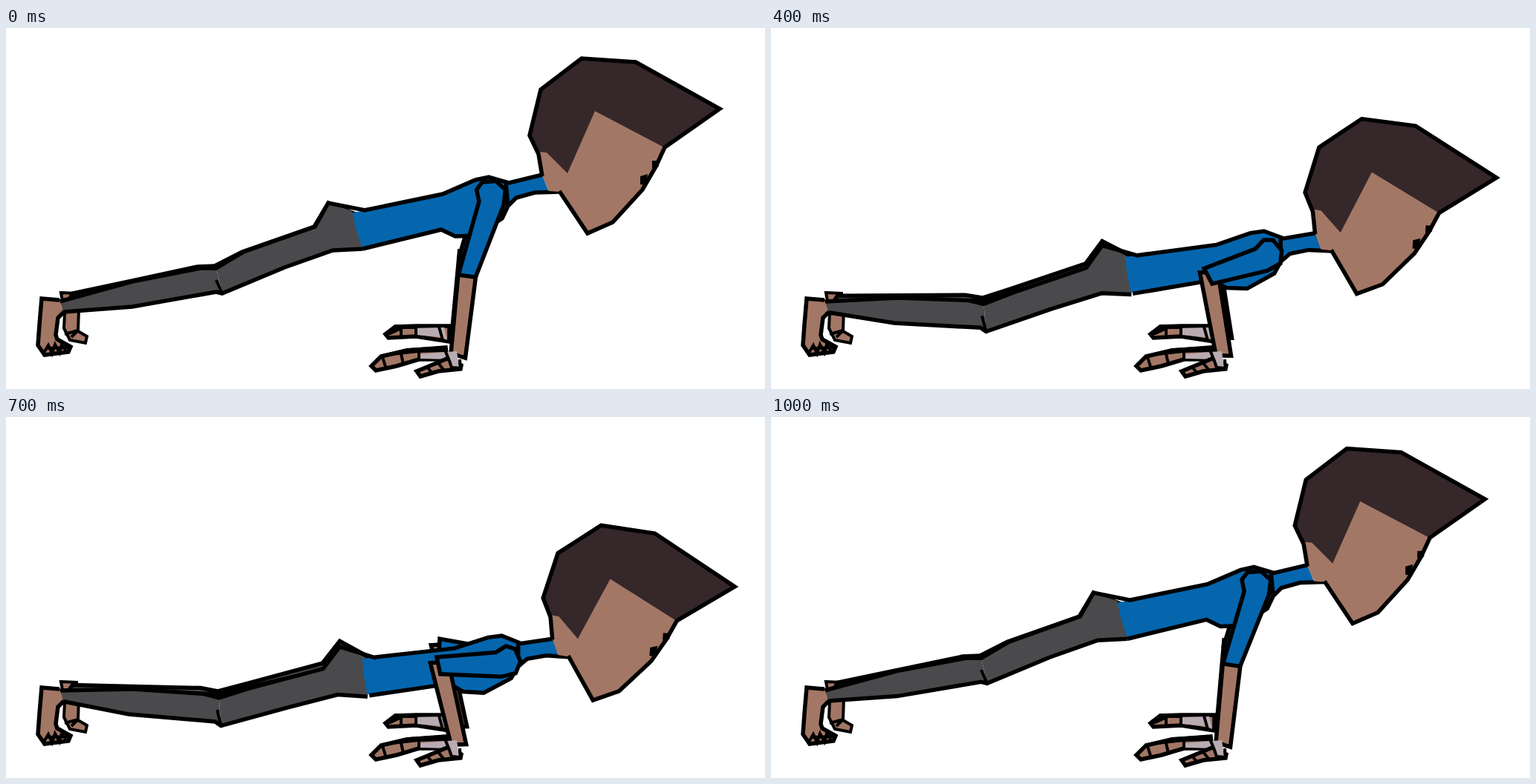
Animation of 1022x487 px, one loop 1100 ms. Source, as an HTML page:

```html
<!DOCTYPE html>
<html lang="en">
<head>
<meta charset="utf-8">
<title>Push-up</title>
<style>
  html, body { margin: 0; width: 100%; height: 100%; overflow: hidden; background: #fff; }
  svg { display: block; width: 100%; height: 100%; }
  .line { fill: none; }
  .line, .limb { stroke: #000; stroke-width: 5.5; stroke-linejoin: miter; stroke-miterlimit: 3; }
  .thin { stroke-width: 4; }
  .skin { fill: #a37765; }
  .hair { fill: #35272a; }
  .shirt { fill: #0566ae; }
  .pants { fill: #4a4a4c; }
  .farPants { fill: #4a5150; }
  .wrap { fill: #b9abb2; }
</style>
</head>
<body>
<svg viewBox="0 0 1022 487">
  <path class="limb skin thin" d="M74 357L95 358L98 380L97 409L109 416L107 425L86 421L78 405L79 385Z"/>
  <path class="line thin" d="M79 413L97 408L88 417"/>
  <path id="farCalf" class="limb farPants"/>
  <path id="farThigh" class="limb farPants"/>

  <g id="farHand">
    <path class="limb skin" d="M511 413L524 403L552 402L597 402L597 423L552 416L515 418Z"/>
    <path d="M508 414L524 400L552 400L552 406L535 406L518 414Z"/>
    <path class="wrap" d="M553 405L590 404L594 421L585 417L553 414Z"/>
    <path class="line thin" d="M532 403V416M552 402V417M583 403L588 421"/>
  </g>
  <path id="farFore" class="limb skin"/>
  <path id="farUpper" class="limb shirt"/>

  <g id="torso">
    <path class="shirt" d="M462 250L484 246L588 224L632 206L650 201L677 209L722 198L731 221L712 222L687 229L676 240L668 257L633 280L605 281L586 272L472 298Z"/>
    <path class="line" d="M482 246L588 224L632 205L650 201L677 209L722 198M746 221L712 222L687 229L676 240L668 257L633 280L605 281L586 272L480 298M673 209L676 240"/>
  </g>

  <path id="thigh" class="pants"/>
  <path id="calf" class="pants"/>
  <path id="legTop" class="line"/>
  <path id="legBase" class="line"/>
  <path id="kneeMark" class="line thin"/>

  <g id="foot">
    <path class="skin" d="M48 365L72 367L77 383L71 390L68 418L86 428L84 438L52 441L43 430L45 400Z"/>
    <path class="line" d="M72 367L48 365L45 400L43 428L52 441L84 437L87 430L69 420L67 414L70 391L78 383"/>
    <path class="line thin" d="M51 438L57 428L62 439L66 427L72 438L75 427L81 436M56 432L84 431"/>
  </g>

  <g id="head">
    <path class="skin" d="M716 166L793 110L887 160L874 188L855 222L817 262L783 277L746 221L731 220L721 197Z"/>
    <path class="hair" d="M775 41L848 46L961 109L886 161L793 112L756 196L728 168L716 167L705 145L720 83Z"/>
    <path class="line" d="M722 200L717 170L705 145L720 83L775 41L848 46L961 109L887 161L875 187L857 218L817 262L783 277L745 220"/>
    <path d="M870 179H879V187L870 189ZM854 200L864 197L862 212L854 211Z"/>
  </g>

  <g id="hand">
    <path class="limb skin" d="M492 456L505 443L540 435L592 431L594 447L556 447L526 456L498 462Z"/>
    <path d="M503 441L540 432L592 429L592 437L556 438L520 442Z"/>
    <path class="wrap" d="M557 440L594 437L596 447L557 446Z"/>
    <path class="line thin" d="M507 444L512 460M532 440L535 453M556 437V449"/>
    <path class="limb skin" d="M553 463L570 456L594 446L613 455L612 460L582 463L558 470Z"/>
    <path class="line thin" d="M567 457L574 466M582 452L590 462"/>
  </g>
  <path id="fore" class="limb skin"/>
  <path class="wrap" d="M594 437L607 436L610 457L600 456L597 449Z"/>
  <path class="line thin" d="M590 432L597 449L600 458L612 459L611 447"/>
  <path id="upper" class="limb shirt"/>
</svg>
<script>
const STEP = 100, STEPS = 11;
const wrist = [609, 440], farOffset = [1, -24];

// Leg outline at the top of the push-up; the lower poses follow from sink().
const knee = [283, 324], kneeBase = [291, 358], hip = [434, 236];
const calfTop = [[72, 369], [170, 342], [262, 324], knee];
const calfBase = [[78, 383], [170, 376], [283, 356], kneeBase];
const thighTop = [knee, [320, 302], [416, 268], hip];
const thighBase = [kneeBase, [375, 323], [440, 300], [480, 298]];
const farCalf = [[90, 358], [170, 341], [258, 322], [281, 321], knee, [84, 368]];
const farThigh = [[281, 321], [318, 302], [415, 268], hip, [480, 255], knee];

const clamp = v => Math.min(1, Math.max(0, v));
const smooth = (from, to, t) => {
  const u = clamp((t - from) / (to - from));
  return u * u * (3 - 2 * u);
};
const pulse = (t, start, full, release, end) => smooth(start, full, t) - smooth(release, end, t);

const el = id => document.getElementById(id);
const draw = (id, points, close = true) =>
  el(id).setAttribute("d", "M" + points.map(p => p.join(" ")).join("L") + (close ? "Z" : ""));
const move = (id, drop, dx, dy, angle, x, y) =>
  el(id).setAttribute("transform", `translate(${dx * drop} ${dy * drop}) rotate(${angle * drop} ${x} ${y})`);

// Travel grows from the fixed ankle to the hip; the knee gives way earlier than the hip.
function sink([x, y], drop, depth = 1) {
  const early = 1 - (1 - drop) ** 1.8;
  const amount = drop + (early - drop) * clamp((410 - x) / 120);
  const shin = clamp((x - 75) / 210), thigh = clamp((x - 285) / 195) ** .7;
  const dx = (58 - y / 6) * clamp((x - 72) / 90);
  return [x + dx * amount, y + (58 * shin + 38 * thigh) * depth * amount];
}

// Maps [along, across] points into the frame of the bone from a to b.
function bone(id, a, b, outline) {
  const length = Math.hypot(b[0] - a[0], b[1] - a[1]);
  const ux = (b[0] - a[0]) / length, uy = (b[1] - a[1]) / length;
  draw(id, outline(length).map(([s, n]) => [a[0] + ux * s - uy * n, a[1] + uy * s + ux * n]));
}
const forearm = length => [[-6, 12], [length, 10], [length + 4, -10], [-2, -12]];
const upperArm = length => [[9, 15], [-5, 23], [-17, 19], [-24, 2], [-17, -14], [3, -18],
  [length, -12], [length + 4, 11]];

function pose(step) {
  const drop = pulse(step, 2.05, 5.33, 5.8, 10.3);
  const fold = pulse(step, 1.4, 4.9, 7.5, 10.2);
  const leg = (id, points, close, depth) => draw(id, points.map(p => sink(p, drop, depth)), close);

  leg("farCalf", farCalf, true, .9);
  leg("farThigh", farThigh, true, .9);
  leg("thigh", [...thighTop, [466, 247], [471, 270], ...thighBase.toReversed()]);
  leg("calf", [...calfTop, ...calfBase.toReversed()]);
  leg("legTop", [...calfTop, ...thighTop, [484, 246]], false);
  leg("legBase", [...calfBase, ...thighBase], false);
  leg("kneeMark", [[283, 340], kneeBase], false);

  move("torso", drop, 17, 95, 6.5, 484, 246);
  move("head", drop, 14.5, 124, 5.6, 746, 221);

  const lean = .11 - .34 * fold;
  const elbow = [wrist[0] + 108 * Math.sin(lean), wrist[1] - 108 * Math.cos(lean)];
  const shoulder = [654 + 18 * drop, 230 + 124 * drop];
  const behind = ([x, y]) => [x + farOffset[0], y + farOffset[1]];
  bone("farFore", behind(elbow), behind(wrist), forearm);
  bone("farUpper", [shoulder[0] - 4, shoulder[1] - 3], behind(elbow), upperArm);
  bone("fore", elbow, wrist, forearm);
  bone("upper", shoulder, elbow, upperArm);
}

let shown = -1;
function tick() {
  const step = Math.floor(performance.now() / STEP) % STEPS;
  if (step !== shown) pose(shown = step);
  requestAnimationFrame(tick);
}
tick();
</script>
</body>
</html>
```
